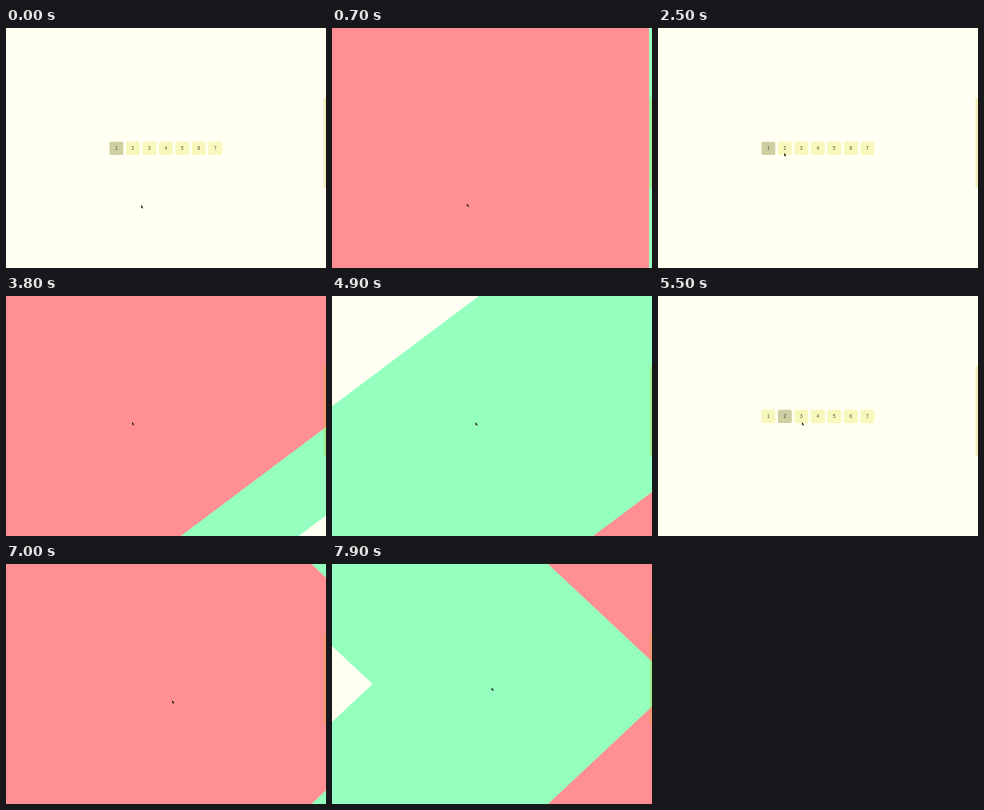
Recreate the animation shown at these times as an HTML page. Size 320 by 240 pixels, loop 8000 ms.

```html
<!DOCTYPE html>
<html lang="en">
<head>
<meta charset="utf-8">
<title>Page transitions</title>
<style>
  html, body { margin: 0; width: 100%; height: 100%; overflow: hidden; background: #fffff2; }
  svg { display: block; width: 100vw; height: 100vh; }
  text { font: 4.6px "Liberation Sans", Arial, sans-serif; text-anchor: middle; fill: #444430; }
</style>
</head>
<body>
<svg viewBox="0 0 320 240">
  <defs>
    <linearGradient id="edge">
      <stop offset="0" stop-color="#c0b800" stop-opacity=".1"/>
      <stop offset="1" stop-color="#c0b800" stop-opacity=".3"/>
    </linearGradient>
  </defs>
  <rect width="320" height="240" fill="#fffff2"/>
  <g id="buttons"></g>
  <path id="green" fill="#94ffbe" fill-rule="evenodd"/>
  <path id="red" fill="#ff8f92" fill-rule="evenodd"/>
  <rect x="317" y="70" width="3" height="90" fill="url(#edge)"/>
  <path id="cursor" d="M0 0V3.1L.8 2.5L1.5 3.8L2 3.5L1.5 2.3H2.3Z" fill="#222214"/>
</svg>
<script>
const LOOP = 8000, STEP = 100, DURATION = 700;
// Start times, relative to the transition, of each layer's leading and trailing edge
const EDGES = { green: [0, 1376], red: [115, 1145] };
const SWITCH_PAGE = 900;
const STARTS = [-22, 3254, 6326];

// Area swept from the left at progress p, one shape per transition
const SWEEPS = [
  p => `M0 0H${320 * p}V240H0Z`,
  p => `M0 0H${640 * p}L0 ${480 * p}Z`,
  p => `M${448 * p} 120l-1024 -960v1920Z`
];

const CURSOR_PATH = [
  [0, 135, 177], [1600, 134.5, 173.5], [1900, 134, 172], [2500, 126, 125],
  [3800, 126, 126], [4900, 143.5, 126.3], [5800, 144, 126],
  [6200, 147, 126], [6600, 169, 142], [7900, 159.5, 123.5]
];

const byId = id => document.getElementById(id);
const clamp = x => Math.min(1, Math.max(0, x));
const ease = x => x < .5 ? 4 * x ** 3 : 1 - 4 * (1 - x) ** 3;

byId("buttons").innerHTML = Array.from({ length: 7 }, (_, i) => {
  const x = 110.4 + 16.5 * i;
  return `<rect x="${x - 6.9}" y="113.7" width="13.8" height="13.4" rx="1.5"/>
    <text x="${x}" y="122.1">${i + 1}</text>`;
}).join("");
const buttons = document.querySelectorAll("#buttons rect");

function cursorAt(t) {
  const next = CURSOR_PATH.findIndex(k => k[0] > t);
  if (next < 0) return CURSOR_PATH.at(-1).slice(1);
  const [a, b] = [CURSOR_PATH[next - 1], CURSOR_PATH[next]];
  const f = (t - a[0]) / (b[0] - a[0]);
  return [1, 2].map(i => a[i] + (b[i] - a[i]) * f);
}

function render(t) {
  const current = STARTS.findLastIndex(start => t >= start);
  const elapsed = t - STARTS[current];
  for (const [id, delays] of Object.entries(EDGES)) {
    const fronts = delays.map(d => ease(clamp((elapsed - d) / DURATION)));
    byId(id).setAttribute("d", fronts.filter(p => p > 0).map(SWEEPS[current]).join(""));
  }
  const active = elapsed < SWITCH_PAGE ? Math.max(0, current - 1) : current;
  buttons.forEach((b, i) => b.setAttribute("fill", i === active ? "#cfcfa4" : "#f8f8bd"));
  byId("cursor").setAttribute("transform", `translate(${cursorAt(t)})`);
}

function frame() {
  const t = Math.floor(performance.now() % LOOP / STEP) * STEP;
  render(t < 200 ? 0 : t);
  requestAnimationFrame(frame);
}
frame();
</script>
</body>
</html>
```
